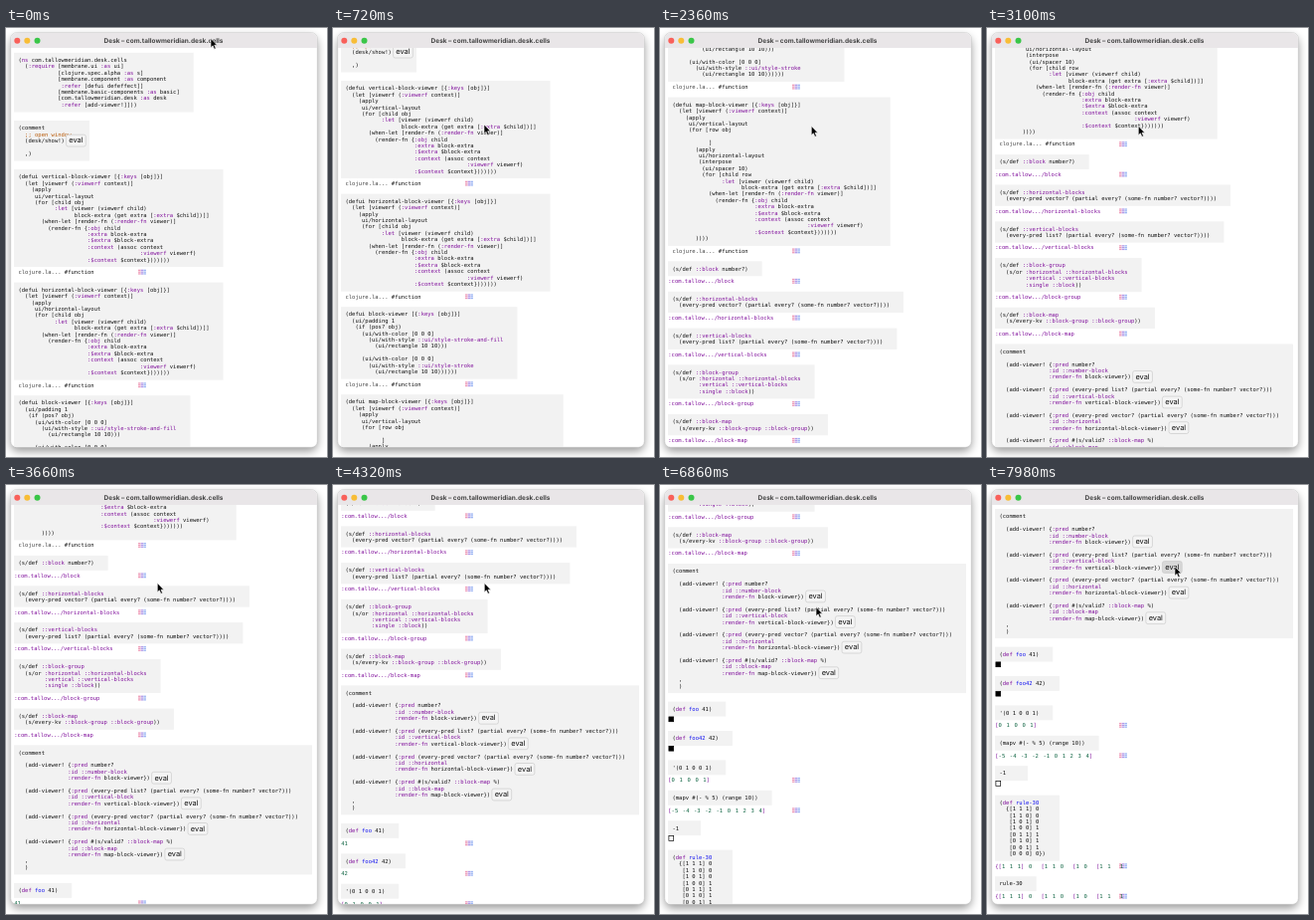
An HTML page that plays this animation: 323x431 px, repeating every 8 s.

```html
<!DOCTYPE html>
<html lang="en">
<head>
<meta charset="utf-8">
<title>Desk</title>
<style>
html, body { margin: 0; width: 100%; height: 100%; overflow: hidden; background: #fff; }
svg { display: block; width: 323px; height: 431px; }
text { white-space: pre; text-rendering: geometricPrecision; }
.code { font: 5.5px "DejaVu Sans Mono", monospace; fill: #111; }
.values { word-spacing: 1.3px; }
.kw { fill: #80109c; }
.def { fill: #1414f0; }
.note { fill: #b85a08; }
.num { fill: #116644; }
.dim { fill: #444; }
.ui { font: 7.4px Inter, sans-serif; fill: #111; text-anchor: middle; }
.title { font: 700 6.5px Inter, sans-serif; fill: #444; text-anchor: middle; }
</style>
</head>
<body>
<svg viewBox="0 0 323 431">
  <defs>
    <filter id="shade" x="-10%" y="-10%" width="120%" height="120%"><feGaussianBlur stdDeviation="5"/></filter>
    <clipPath id="pane"><path d="M5 20H313V415a6 6 0 0 1-6 6H11a6 6 0 0 1-6-6Z"/></clipPath>
  </defs>
  <rect x="5" y="9" width="308" height="416" rx="7" fill="#000" opacity=".42" filter="url(#shade)"/>
  <rect x="4.7" y="4.7" width="308.6" height="416.6" rx="6" fill="#fff" stroke="#bbb" stroke-width=".5"/>
  <path d="M5 20V11a6 6 0 0 1 6-6H307a6 6 0 0 1 6 6V20Z" fill="#e9e6e8"/>
  <circle cx="11.3" cy="12.8" r="3" fill="#f9605a"/>
  <circle cx="21.3" cy="12.8" r="3" fill="#f8bd36"/>
  <circle cx="31.5" cy="12.8" r="3" fill="#3ac648"/>
  <text class="title" x="158.5" y="15.1">Desk – com.tallowmeridian.desk.cells</text>
  <g clip-path="url(#pane)"><g id="doc"></g></g>
  <path id="cursor" d="M0 0V9.2L2.1 7.3 3.6 10.7 5.2 10 3.7 6.7H6.5Z" fill="#000" stroke="#fff" stroke-width=".6"/>
</svg>
<script>
const LOOP = 8000, CLICK = 6430;
const CW = 3.311, LH = 6.4, LEFT = 12.5;
const doc = document.getElementById('doc');
const cursor = document.getElementById('cursor');

const SCROLL = [
  [0, 0], [420, 0], [700, 85], [1120, 165], [1380, 165], [1560, 210.5], [1900, 300],
  [2360, 387.5], [2700, 437], [3100, 494.8], [3700, 555], [4320, 611], [5000, 672],
  [5480, 712], [5720, 716.5], [6720, 716.5], [7000, 750], [7260, 775], [7400, 777],
  [7800, 786], [7980, 788.4]
];
const POINTER = [
  [0, 206, 10.5], [20, 206, 10.5], [260, 152, 97], [1200, 152, 97], [1240, 152.3, 98.5],
  [5200, 152.3, 98.5], [5640, 156, 127], [6720, 156, 127], [7260, 160, 110], [7900, 189, 82]
];

const cells = (indent, layout) => `(for [child ${layout}
      :let [viewer (viewerf child)
            block-extra (get extra [:extra $child])]]
  (when-let [render-fn (:render-fn viewer)]
    (render-fn {:obj child
                :extra block-extra
                :$extra $block-extra
                :context (assoc context
                                :viewerf viewerf)
                :$context $context}))))))`.replace(/^/gm, ' '.repeat(indent));

const layoutViewer = dir => `(defui ${dir}-block-viewer [{:keys [obj]}]
  (let [viewerf (:viewerf context)]
    (apply
     ui/${dir}-layout
${cells(5, 'obj')}`;

const seqSpec = (name, pred) => `(s/def ::${name}-blocks
  (every-pred ${pred}? (partial every? (some-fn number? vector?))))`;

// "@" marks an eval button
const addViewer = (pred, id, fn) => `
  (add-viewer! {:pred ${pred}
               :id ::${id}
               :render-fn ${fn}-viewer})@
`;
const seqPred = p => `(every-pred ${p}? (partial every? (some-fn number? vector?)))`;

const bits = [7, 6, 5, 4, 3, 2, 1, 0].map(n =>
  `[${[...n.toString(2).padStart(3, '0')].join(' ')}] ${30 >> n & 1}`);

const FN = { kind: 'fn', text: 'clojure.la... #function' };
const key = name => ({ kind: 'kw', text: ':com.tallow.../' + name });
const num = n => ({ kind: 'num', text: String(n), value: n });
const list = text => ({ kind: 'list', text });
const RULE = list('{[1 1 1] 0  [1 1 0  [1 0  [1 1  1');

const BLOCKS = [
  [`(ns com.tallowmeridian.desk.cells
  (:require [membrane.ui :as ui]
            [clojure.spec.alpha :as s]
            [membrane.component :as component
             :refer [defui defeffect]]
            [membrane.basic-components :as basic]
            [com.tallowmeridian.desk :as desk
             :refer [add-viewer!]]))`],
  [`(comment
  ;; open window
  (desk/show!)@

  ,)`],
  [layoutViewer('vertical'), FN],
  [layoutViewer('horizontal'), FN],
  [`(defui block-viewer [{:keys [obj]}]
  (ui/padding 1
   (if (pos? obj)
     (ui/with-color [0 0 0]
       (ui/with-style ::ui/style-stroke-and-fill
         (ui/rectangle 10 10)))

     (ui/with-color [0 0 0]
       (ui/with-style ::ui/style-stroke
         (ui/rectangle 10 10))))))`, FN],
  [`(defui map-block-viewer [{:keys [obj]}]
  (let [viewerf (:viewerf context)]
    (apply
     ui/vertical-layout
     (for [row obj

           ]
       (apply
        ui/horizontal-layout
        (interpose
         (ui/spacer 10)
${cells(9, 'row')}
       ))))`, FN],
  ['(s/def ::block number?)', key('block')],
  [seqSpec('horizontal', 'vector'), key('horizontal-blocks')],
  [seqSpec('vertical', 'list'), key('vertical-blocks')],
  [`(s/def ::block-group
  (s/or :horizontal ::horizontal-blocks
        :vertical ::vertical-blocks
        :single ::block))`, key('block-group')],
  [`(s/def ::block-map
  (s/every-kv ::block-group ::block-group))`, key('block-map')],
  ['(comment\n' +
    addViewer('number?', 'number-block', 'block') +
    addViewer(seqPred('list'), 'vertical-block', 'vertical-block') +
    addViewer(seqPred('vector'), 'horizontal', 'horizontal-block') +
    addViewer('#(s/valid? ::block-map %)', 'block-map', 'map-block') +
    '  ,\n  )'],
  ['(def foo 41)', num(41)],
  ['(def foo42 42)', num(42)],
  ["'(0 1 0 0 1)", list('[0 1 0 0 1]')],
  ['(mapv #(- % 5) (range 10))', list('[-5 -4 -3 -2 -1 0 1 2 3 4]')],
  ['-1', num(-1)],
  ['(def rule-30\n  {' + bits.join('\n   ') + '})', RULE],
  ['rule-30', RULE]
];

function add(parent, tag, attrs, text) {
  const el = document.createElementNS('http://www.w3.org/2000/svg', tag);
  for (const k in attrs) el.setAttribute(k, attrs[k]);
  if (text) el.textContent = text;
  parent.append(el);
  return el;
}

const CODE = /(?<note>;;.*)|(?<kw>::?[\w$][\w$\/.-]*|(?<=\()(?:ns|def)(?= ))|(?<def>(?<=\(def )\S+)/g;
const VALUES = /(?<num>-?\d+)|(?<kw>[\[\]{}])/g;

// One line of text, split into coloured runs at fixed columns
function write(parent, line, x, y, rule, cls = '') {
  const t = add(parent, 'text', { class: 'code ' + cls, y });
  let at = 0;
  const gap = cls === 'values' ? 1.3 : 0;
  const run = (end, kind) => {
    const raw = line.slice(at, end), s = raw.trimStart();
    const col = at + raw.length - s.length;
    const spaces = line.slice(0, col).split(' ').length - 1;
    if (s) add(t, 'tspan', { class: kind, x: x + col * CW + spaces * gap }, s);
    at = end;
  };
  for (const m of line.matchAll(rule)) {
    run(m.index, '');
    run(m.index + m[0].length, Object.keys(m.groups).find(k => m.groups[k]));
  }
  run(line.length, '');
}

function icon(parent, y) {
  [['#ef9db8', 133], ['#b49be8', 135.7], ['#9bb4f3', 138.4]].forEach(([fill, x]) => {
    for (let i = 0; i < 3; i++)
      add(parent, 'rect', { x, y: y - 2.4 + i * 1.8, width: 2.5, height: 1.3, fill });
  });
}

const buttons = [];
let top0 = 24.8, topNow = 24.8;

const blocks = BLOCKS.map(([code, result]) => {
  const lines = code.split('\n');
  const g = add(doc, 'g', {});
  const b = { g, before: top0, after: topNow };
  const bottom = lines.length * LH + 8.5;
  const back = add(g, 'rect', { x: 8, y: 0, height: bottom, fill: '#f2f2f2' });
  let right = 41;
  lines.forEach((raw, i) => {
    const line = raw.replace('@', ''), mid = 7.4 + i * LH;
    const end = LEFT + line.length * CW;
    right = Math.max(right, end + 14);
    write(g, line, LEFT, mid + 1.9, CODE);
    if (raw === line) return;
    const x = end + 1.7;
    right = Math.max(right, x + 23.5);
    const face = add(g, 'rect', { x, y: mid - 6, width: 19.8, height: 11.8, rx: 2, stroke: '#c4c4c4', 'stroke-width': .6 });
    add(g, 'text', { class: 'ui', x: x + 9.9, y: mid + 2.2 }, 'eval');
    buttons.push({ face, x, y: mid - 6, b });
  });
  back.setAttribute('width', right - 8);

  const step = lines.length * LH + (result ? 24 : 17);
  top0 += step;
  topNow += step;
  if (!result) return b;

  const { kind, text, value } = result, mid = bottom + 5;
  b.plain = add(g, 'g', {});
  icon(b.plain, mid);
  if (kind === 'fn') write(b.plain, text, LEFT, mid + 1.9, /(?<dim>clojure\S+)/g);
  else if (kind === 'kw') write(b.plain, text, 8.3, mid + 1.9, /(?<kw>.+)/g);
  else write(b.plain, text, 8.3, mid + 1.9, VALUES, kind === 'list' ? 'values' : '');
  if (kind === 'num') {
    topNow -= 1;
    b.square = add(g, 'rect', {
      x: 8.9, y: bottom + .4, width: 4.8, height: 4.8,
      fill: value > 0 ? '#000' : '#fff', stroke: '#000', 'stroke-width': .7
    });
  }
  return b;
});

function sample(table, t) {
  const i = table.findIndex(p => p[0] > t);
  if (i < 0) return table[table.length - 1].slice(1);
  const a = table[i - 1], b = table[i], k = (t - a[0]) / (b[0] - a[0]);
  return a.slice(1).map((v, j) => v + (b[j + 1] - v) * k);
}

function draw(now) {
  const t = now % LOOP, clicked = t >= CLICK;
  const [scroll] = sample(SCROLL, t), [cx, cy] = sample(POINTER, t);
  doc.setAttribute('transform', `translate(0 ${-scroll})`);
  cursor.setAttribute('transform', `translate(${cx} ${cy})`);
  for (const b of blocks) {
    b.y = clicked ? b.after : b.before;
    b.g.setAttribute('transform', `translate(0 ${b.y})`);
    if (!b.square) continue;
    b.square.setAttribute('visibility', clicked ? 'visible' : 'hidden');
    b.plain.setAttribute('visibility', clicked ? 'hidden' : 'visible');
  }
  for (const { face, x, y, b } of buttons) {
    const dy = cy - (b.y + y - scroll);
    const over = cx > x && cx < x + 20 && dy > 0 && dy < 12;
    face.setAttribute('fill', over ? '#d8d8d8' : '#f4f4f4');
  }
}

const start = performance.now();
function tick() {
  draw(performance.now() - start);
  requestAnimationFrame(tick);
}
tick();
</script>
</body>
</html>
```
